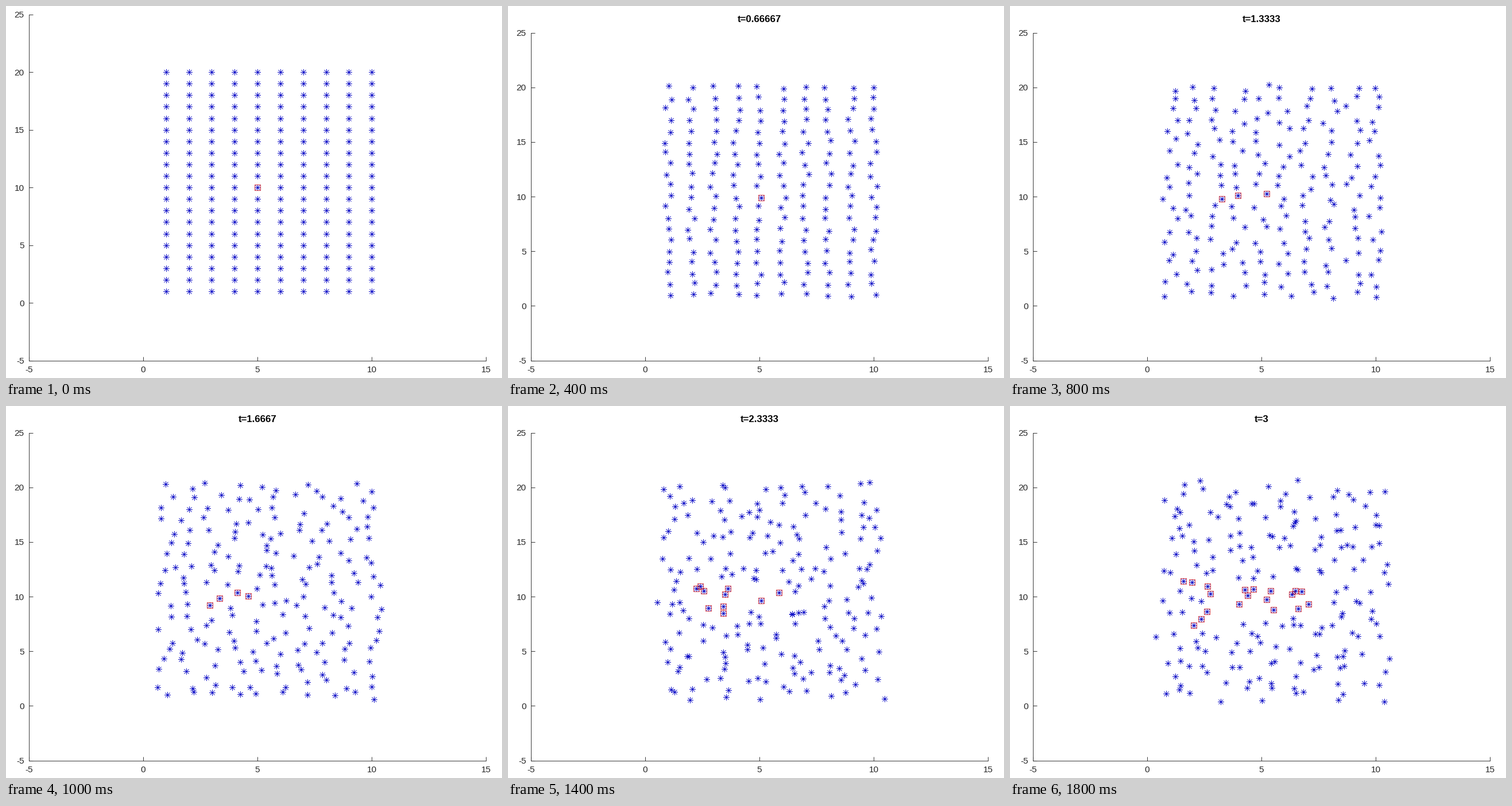
A matplotlib script that plays this animation: 864x648 px, repeating every 2 s.

```python
import matplotlib.pyplot as plt
import numpy as np
from matplotlib.animation import FuncAnimation

W, H = 864, 648
FRAMES, INTERVAL = 10, 200
LEFT, RIGHT, BOTTOM = 40.1, 836.1, 617.6
TOP_PLAIN, TOP_TITLED = 14.6, 46.6   # top edge without and with a title
INK, BLUE, RED = "#262626", "#1414c8", "#d01018"
COLS, ROWS = 10, 20

plt.rcParams["font.family"] = "Liberation Sans"

gx, gy = np.meshgrid(np.arange(1, COLS + 1), np.arange(1, ROWS + 1))
GRID = np.column_stack([gx.ravel(), gy.ravel()]).astype(float)
SEED_POINT = (10 - 1) * COLS + (5 - 1)   # the particle at (5, 10)


def particles(step):
    """Lattice shaken by random offsets whose range grows with time."""
    rng = np.random.default_rng(40 + step)
    amp = min(step / 12, 0.65)
    return GRID + rng.uniform(-amp, amp, GRID.shape)


def spread(path):
    """Marked indices per step: the mark passes to the nearest neighbours."""
    marked, history = [SEED_POINT], []
    for step, pts in enumerate(path):
        while len(marked) < round(1 + step ** 3 / 40):
            gaps = pts[:, None] - pts[marked]
            dist = np.hypot(gaps[..., 0], gaps[..., 1]).min(axis=1)
            dist[marked] = np.inf
            marked.append(int(dist.argmin()))
        history.append(list(marked))
    return history


def place_axes(top):
    ax.set_position([LEFT / W, 1 - BOTTOM / H, (RIGHT - LEFT) / W, (BOTTOM - top) / H])


PATH = [particles(step) for step in range(FRAMES)]
MARKED = spread(PATH)

fig = plt.figure(figsize=(W / 72, H / 72), dpi=72, facecolor="white")
ax = fig.add_axes([0, 0, 1, 1])
ax.set(xlim=(-5, 15), ylim=(-5, 25))
for side in ("top", "right"):
    ax.spines[side].set_visible(False)
for side in ("left", "bottom"):
    ax.spines[side].set(color=INK, linewidth=0.9)

xticks, yticks = range(-5, 16, 5), range(-5, 26, 5)
ax.set_xticks(xticks, labels=[str(v) for v in xticks], va="baseline")
ax.set_yticks(yticks, labels=[str(v) for v in yticks])
ax.tick_params(direction="in", length=7, width=0.9, color=INK,
               labelcolor=INK, labelsize=15.4)
ax.tick_params(axis="x", pad=20.5)
ax.tick_params(axis="y", pad=8.3)

stars, = ax.plot([], [], ls="", marker=(8, 2, 0), ms=11, mew=0.6, mec=BLUE)
boxes, = ax.plot([], [], ls="", marker="s", ms=10, mew=0.8, mec=RED, mfc="none")
title = fig.text(438.3 / W, 1 - 28.3 / H, "", size=16.8, weight="bold",
                 color="black", ha="center", va="baseline")


def update(step):
    place_axes(TOP_TITLED if step else TOP_PLAIN)
    title.set_text(f"t={step / 3:.5g}" if step else "")
    pts = PATH[step]
    stars.set_data(*pts.T)
    boxes.set_data(*pts[MARKED[step]].T)
    return stars, boxes, title


anim = FuncAnimation(fig, update, frames=FRAMES, interval=INTERVAL,
                     repeat=True, repeat_delay=0, blit=False)
plt.show()
```
